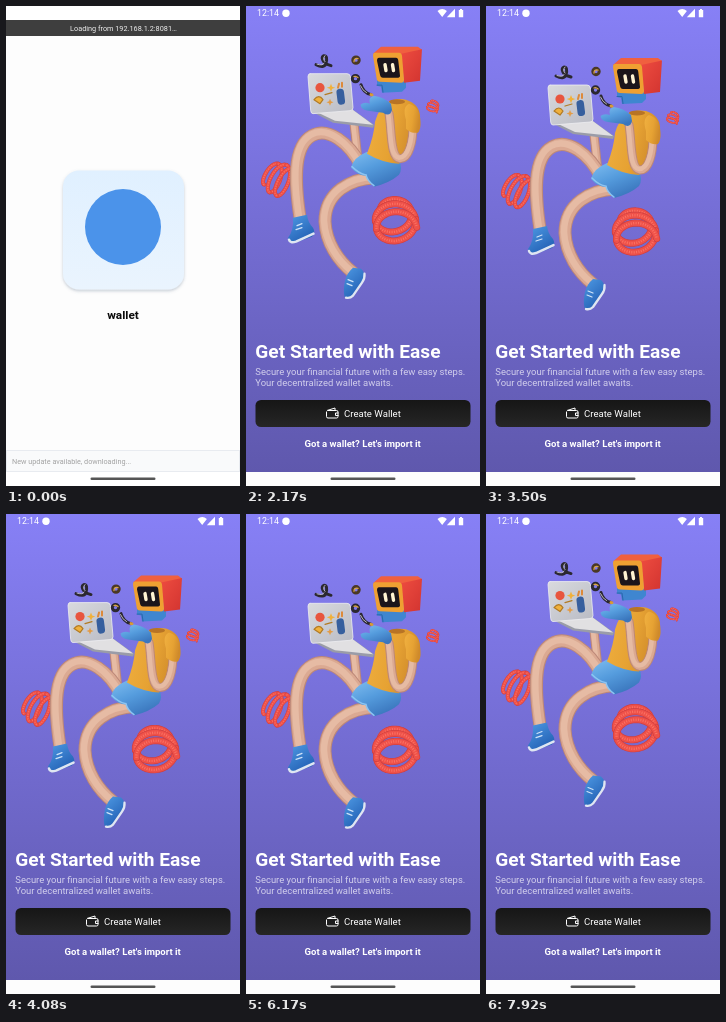
Recreate the animation shown at these times as an HTML page. Size 234x480 px, loop 8 s.

```html
<!DOCTYPE html>
<html lang="en">
<head>
<meta charset="utf-8">
<title>Wallet onboarding</title>
<style>
  html, body { margin: 0; width: 100%; height: 100%; overflow: hidden; background: #fff; }
  svg { display: block; width: 234px; height: 480px; font-family: Roboto, sans-serif; }
  .bold { font-weight: 700; }
</style>
</head>
<body>
<svg viewBox="0 0 234 480">
  <defs>
    <linearGradient id="sky" x2="0" y2="1">
      <stop stop-color="#8780f6"/><stop offset="1" stop-color="#5f58ad"/>
    </linearGradient>
    <linearGradient id="tile" x2="0" y2="1">
      <stop stop-color="#e0f0ff"/><stop offset="1" stop-color="#eaf4fe"/>
    </linearGradient>
    <linearGradient id="button" x2="0" y2="1">
      <stop stop-color="#161616"/><stop offset="1" stop-color="#262626"/>
    </linearGradient>
    <linearGradient id="shirt" x2="1" y2=".3">
      <stop stop-color="#f0b040"/><stop offset=".6" stop-color="#e6a233"/><stop offset="1" stop-color="#cf8a2b"/>
    </linearGradient>
    <linearGradient id="blue" x2=".6" y2="1">
      <stop stop-color="#7fbdf0"/><stop offset=".5" stop-color="#559cdd"/><stop offset="1" stop-color="#3a76bd"/>
    </linearGradient>
    <linearGradient id="shoeBlue" x2=".6" y2="1">
      <stop stop-color="#4f9ae4"/><stop offset="1" stop-color="#2260b4"/>
    </linearGradient>
    <linearGradient id="lid" x2="1" y2="1">
      <stop stop-color="#d9dade"/><stop offset="1" stop-color="#b9bbc4"/>
    </linearGradient>
    <linearGradient id="side" x2="1" y2="1">
      <stop stop-color="#ee4c40"/><stop offset="1" stop-color="#d23430"/>
    </linearGradient>
    <filter id="soft" x="-20%" y="-20%" width="140%" height="140%">
      <feDropShadow dx="0" dy="1.5" stdDeviation="1.5" flood-color="#5a7088" flood-opacity=".35"/>
    </filter>
  </defs>

  <g id="splash">
    <rect width="234" height="480" fill="#fff"/>
    <rect y="4" width="234" height="462" fill="#fdfdfd"/>
    <rect x="57" y="164.500" width="121" height="119" rx="16" fill="url(#tile)" filter="url(#soft)"/>
    <circle cx="117" cy="221" r="38" fill="#4b93ea"/>
    <text x="117" y="312.500" text-anchor="middle" class="bold" font-size="11.800" fill="#0a0a0a">wallet</text>
    <g id="loading">
      <rect width="234" height="14" fill="#fff"/>
      <rect y="14" width="234" height="16" fill="#3e3e3e"/>
      <text x="117.500" y="24.700" text-anchor="middle" font-size="7.300" fill="#eee">Loading from 192.168.1.2:8081…</text>
      <rect x=".5" y="444.500" width="233" height="21" fill="#f9fafb" stroke="#e8ebf0"/>
      <text x="6" y="458" font-size="7.250" fill="#a2a2a2">New update available, downloading...</text>
    </g>
  </g>

  <g id="app">
    <rect width="234" height="466" fill="url(#sky)"/>
    <rect y="466" width="234" height="14" fill="#fdfdfd"/>

    <g fill="#fff">
      <text x="11" y="10.300" font-size="8.800">12:14</text>
      <circle cx="40" cy="7.200" r="3.700"/>
      <path d="M191.500 5q4.700-3.800 9.400 0l-4.700 6zM209 2.800v8.400h-8.200zM212.800 4h1.200v-1h2v1h1.200v7.300h-4.400z"/>
    </g>

    <g id="figure" stroke-linecap="round" stroke-linejoin="round">
      <g id="rings"></g>
      <g id="legs"></g>

      <!-- shoes -->
      <path d="M47 242L61 239Q62 247 67 252Q70 257 66 261L49 267Q42 269 42 262Q48 254 47 242" fill="url(#shoeBlue)"/>
      <path d="M43 264Q44 268 50 266L67.500 258" fill="none" stroke="#dfe6f2" stroke-width="2.500"/>
      <path d="M51 250l5-2M50 254l6-2" stroke="#cfe3f8" stroke-width="1.200"/>
      <path d="M99 305Q101 297 107 292L115 293Q120 297 117 304L106 320Q101 324 98.500 321Q97 314 99 305" fill="url(#shoeBlue)"/>
      <path d="M118.500 298Q119 303 116 307L107 320Q104 323 100 322" fill="none" stroke="#dfe6f2" stroke-width="2.300"/>
      <path d="M102 304l5 2M101 308l5 2" stroke="#cfe3f8" stroke-width="1.200"/>

      <!-- laptop -->
      <path d="M66 136L104 132L128 149L127 152L87 147Z" fill="#9a9ca8"/>
      <path d="M68 135L104 132L127 149L89 145Z" fill="#e1e0e2"/>
      <path d="M64 98L101 98Q104 98 104.400 101L107 132Q107 135 104 135L67 138Q65 138 64.700 135L62 101Q62 98 64 98" fill="url(#lid)" stroke="#eeeef2" stroke-width=".8"/>
      <circle cx="74" cy="112" r="4.600" fill="#e8553e"/>
      <path d="M68 124q5-6 9 0l-3 4zM79 119l7-2" fill="#f0b13d" stroke="#b27b24" stroke-width="1.200"/>
      <path d="M85 108l1.200 3 3 1-3 1.200-1.200 3-1.200-3-3-1.200 3-1z" fill="#f1b13a"/>
      <rect x="91" y="113" width="7.500" height="16" rx="3.500" fill="#365f9e" transform="rotate(-7 95 121)"/>
      <path d="M92 112l1-4M96 111v-4" stroke="#dd8a39" stroke-width="2"/>
      <path d="M84 123l1 2.500 2.500 1-2.500 1-1 2.500-1-2.500-2.500-1 2.500-1z" fill="#e39c45"/>

      <!-- floating trinkets -->
      <g fill="none" stroke="#2b2830" stroke-width="3">
        <path d="M70 89Q78 93 80 88Q82 80 78 80Q74 82 79 88L85 90"/>
        <circle cx="110" cy="84.500" r="3.200" stroke="#4a3824"/>
        <circle cx="109.500" cy="103" r="3.200"/>
        <path d="M115 109Q117 117 125 119"/>
        <path d="M71 88.500q6 2 7-1M79 80q-3 3 0 6M114.500 110q2 5 6 7" stroke="#c9c6d0" stroke-width=".9"/>
        <path d="M108 86q0-4 4-3M108 101q2-1 4 1" stroke="#d9a445" stroke-width="1.300"/>
        <path d="M125 119l1 .3" stroke="#d89b36"/>
      </g>

      <!-- shorts, shirt and head -->
      <path d="M121 176L153 184Q157 193 153 199Q144 207 128 211Q122 206 120 200Q112 200 105 192Q107 182 121 176" fill="url(#blue)"/>
      <path d="M106 191q7 7 13 8M128 210q-7-5-8-11" fill="none" stroke="#8cc4f2" stroke-width="1.500"/>
      <path d="M141 127Q150 122 160 124Q173 128 174 140Q174 151 166 160L153 188Q136 187 121 178Q128 160 129 146Q133 132 141 127" fill="url(#shirt)"/>
      <ellipse cx="151" cy="126" rx="8" ry="2.500" fill="#b87425"/>
      <path d="M131 104L160 105L160 112L156 116L136 117L135 111L131 110Z" fill="#3f86d0"/>
      <path d="M131 109.500h5l1 7" fill="none" stroke="#2b65ae"/>
      <path d="M127 78L135 71L172 71L176 74L156 79Z" fill="#f0603f"/>
      <path d="M155 78L176 73.500L174 105L158 107Z" fill="url(#side)"/>
      <path d="M129 77L153 77Q155.500 77 156 80L158 104Q158 107 155 107L134 106Q131 106 130.700 103L127 80Q127 77 129 77" fill="#efa032"/>
      <path d="M133 82L150 82Q152 82 152.300 85L154 100Q154 102 151 102L137 102Q134.500 102 134 99L131 85Q131 82 133 82" fill="#1b151b"/>
      <path d="M139 89l1 6M146.500 89l1 6" stroke="#fff3d2" stroke-width="3.400"/>
      <g id="arm"></g>
      <path d="M160 144Q156 131 163 128Q174 131 174.500 146Q175 153 172 157Q165 158 160 153Z" fill="url(#shirt)"/>
      <path d="M146 134Q144 142 137 137L122 135Q115 134 114.500 129Q118 126 124 128Q122 121 128 120Q137 121 145 128" fill="url(#blue)"/>
    </g>

    <text x="9.300" y="352" class="bold" font-size="19.150" fill="#fff">Get Started with Ease</text>
    <g font-size="9.480" fill="#d2cfec">
      <text x="9.300" y="369">Secure your financial future with a few easy steps.</text>
      <text x="9.300" y="380.300">Your decentralized wallet awaits.</text>
    </g>
    <rect x="9.500" y="394" width="215" height="27" rx="5.500" fill="url(#button)"/>
    <g fill="none" stroke="#fff" stroke-width="1">
      <path d="M81 404.500L89 402V404.500M82 404.500H90.500Q92 404.500 92 406V410.500Q92 412 90.500 412H82Q80.500 412 80.500 410.500V405.500"/>
      <path d="M92.500 407H89.500v2.500h3"/>
    </g>
    <text x="98" y="410.700" font-size="9.600" fill="#fff">Create Wallet</text>
    <text x="116.700" y="441.300" text-anchor="middle" class="bold" font-size="9.550" fill="#fff">Got a wallet? Let's import it</text>
  </g>

  <rect x="84.500" y="471.500" width="65" height="2.500" rx="1.250" fill="#555"/>
</svg>

<script>
const LOOP = 8000, LOADED = 450, APP_START = 2150;
const LOWEST = 5150, HALF_PERIOD = 2850, TRAVEL = 30.5;
const $ = id => document.getElementById(id);

const stroke = (d, width, color, extra = '') =>
  `<path d="${d}" fill="none" stroke="${color}" stroke-width="${width}" ${extra}/>`;

// Rounded limb: dark rim, body tone and an offset highlight.
const limb = (d, width) =>
  stroke(d, width, '#bd8878') +
  stroke(d, width - 2, '#dba992') +
  stroke(d, width * .5, '#e6bba4', 'transform="translate(-1 -1)"');

// Ribbed helix that opens up over its first turn, drawn in half turns so that later ones overlap.
function coil(x, y, rx, ry, step, tilt, width, turns) {
  const point = turn => {
    const r = .7 + .3 * Math.min(1, turn), a = Math.PI * (1 + 2 * turn);
    return `${(r * rx * Math.cos(a)).toFixed(2)} ${(r * ry * Math.sin(a) + step * (turn - turns / 2)).toFixed(2)}`;
  };
  let out = '';
  for (let half = 0; half < turns * 2; half++) {
    const points = [];
    for (let i = 0; i <= 16; i++) points.push(point(Math.min(turns, (half + i / 16) / 2)));
    const d = 'M' + points.join('L');
    out += stroke(d, width, '#cf3f40') + stroke(d, width * .8, '#ee5149') +
      stroke(d, width * .35, '#fb7263', 'stroke-dasharray="1 1.4" stroke-linecap="butt"');
  }
  return `<g transform="translate(${x} ${y}) rotate(${tilt})">${out}</g>`;
}

$('rings').innerHTML =
  coil(149.5, 244.5, 20, 16.5, 8, -8, 7, 2.5) +
  coil(32, 203, 16, 7, 8, -65, 4, 2.5) +
  coil(187, 131, 5.5, 3, 3.5, 20, 1.8, 2.5);
$('legs').innerHTML =
  limb('M108 148L112 184', 9) +
  limb('M115 190C103 167 82 151 66 160C46 171 49 209 54 242', 13) +
  limb('M129 202C105 203 79 216 79 246C80 267 92 285 107 297', 13);
$('arm').innerHTML = limb('M167 150C167 166 163 183 154 183C144 182 146 156 143 138', 9);

const show = (id, visible) => $(id).setAttribute('display', visible ? 'inline' : 'none');

function draw(now) {
  const t = now % LOOP;
  const lift = TRAVEL / 2 * (1 - Math.cos(Math.PI * (t - LOWEST) / HALF_PERIOD));
  show('loading', t < LOADED);
  show('splash', t < APP_START);
  show('app', t >= APP_START);
  $('figure').setAttribute('transform', `translate(0 ${-lift})`);
}

const start = performance.now();
function tick() {
  draw(performance.now() - start);
  requestAnimationFrame(tick);
}
tick();
</script>
</body>
</html>
```
